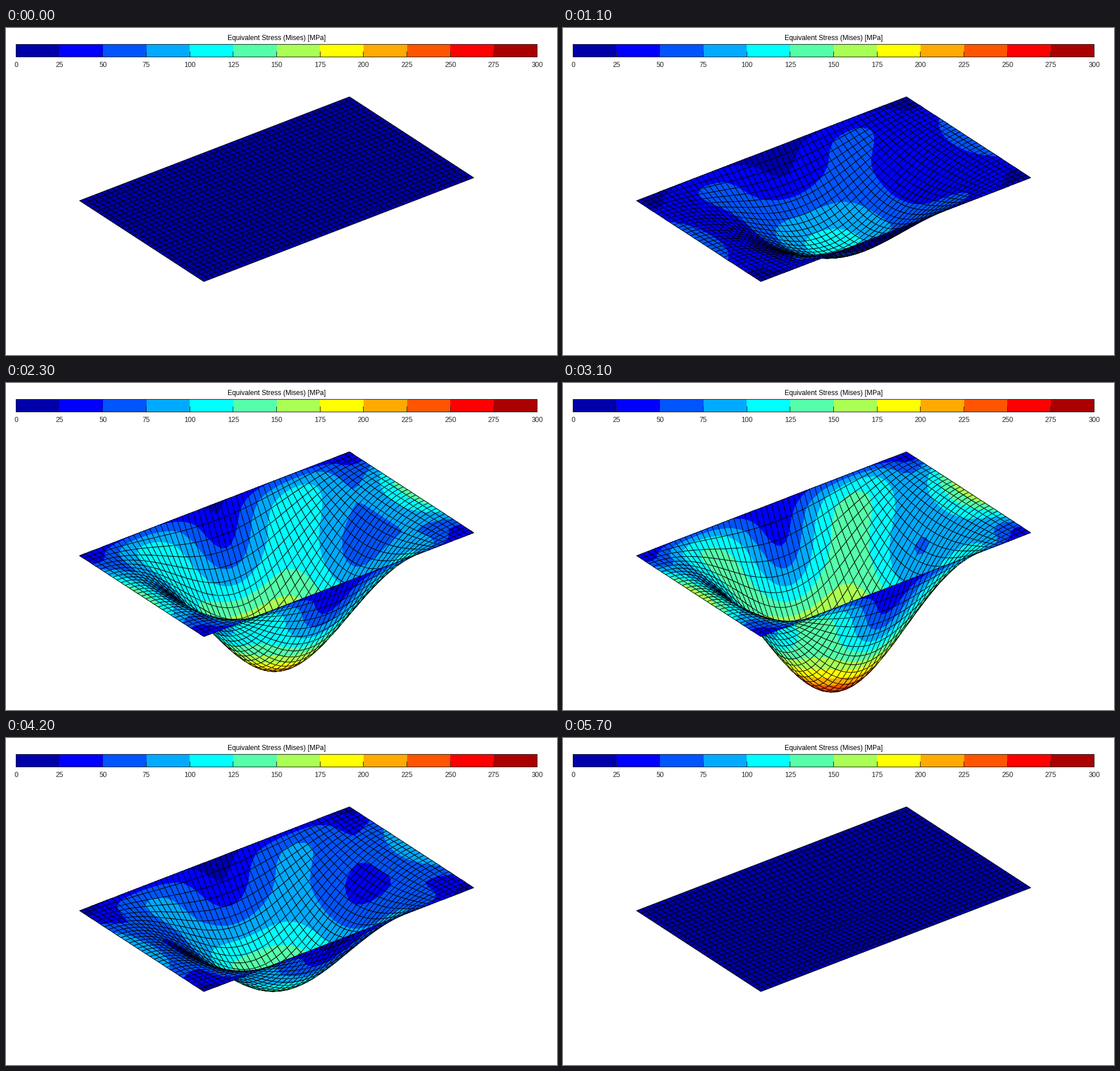
These frames come from a looping animation (960 by 570 pixels, 5800 ms). A matplotlib script:

```python
import numpy as np
import matplotlib.pyplot as plt
from matplotlib.animation import FuncAnimation
from matplotlib.collections import PolyCollection
from matplotlib.patches import Rectangle

W, H, DPI = 960, 570, 100
PT = 72 / DPI                      # points per pixel
FRAMES, STEP_MS = 58, 100
NP, NQ = 50, 30                    # elements along the long and short sides
RISE = 9.3                         # centre deflection in pixels per load step
BAND = 25                          # MPa per colour
COLORS = ["#0000aa", "#0000ff", "#0055ff", "#00aaff", "#00ffff", "#55ffaa",
          "#aaff55", "#ffff00", "#ffaa00", "#ff5500", "#ff0000", "#aa0000"]
PI = np.pi

p, q = np.meshgrid(np.linspace(-.5, .5, NP + 1),
                   np.linspace(-.5, .5, NQ + 1), indexing="ij")
ground = -181 * p + 141 * q
screen_x = 471.6 + 470.3 * p + 216.5 * q


def deflection():
    """Unit shape: short edges clamped, long edges hinged."""
    c = np.cos(PI * p) ** 2
    return c * (1 - .12 * np.sin(PI * p) ** 2) * np.cos(PI * q)


def unit_stress(nu=.3, aspect=5 / 3):
    """Equivalent bending stress per load step."""
    cq = np.cos(PI * q)
    wxx = -2 * PI**2 / aspect**2 * np.cos(2 * PI * p) * cq
    wyy = -PI**2 * np.cos(PI * p) ** 2 * cq
    wxy = PI**2 / aspect * np.sin(2 * PI * p) * np.sin(PI * q)
    mx, my = wxx + nu * wyy, wyy + nu * wxx
    bend = np.sqrt(mx**2 - mx * my + my**2)
    bend *= 1 - .40 * np.sin(PI * q) ** 4 * np.cos(PI * p) ** 2
    bend *= 1 - .27 * np.exp(-((np.abs(p) - .39) / .09) ** 2)
    bend *= 1 + .15 * np.abs(2 * p) ** 12
    gap = .5 - np.abs(q)
    twist = np.sqrt(3) * (1 - nu) * wxy * (.83 - .53 * np.exp(-gap / .04))
    rim = .97 * np.sin(PI * q) ** 4
    return np.sqrt((.896 * bend) ** 2 + (.896 * twist) ** 2 + rim**2)


def corners(a):
    """Four node values of every element."""
    return np.stack([a[:-1, :-1], a[1:, :-1], a[1:, 1:], a[:-1, 1:]],
                    axis=-1).reshape(-1, 4)


QX, QG = corners(screen_x), corners(ground)
QW, QS = corners(deflection()), corners(unit_stress())


def clip_above(pts, vals, level):
    """Part of a polygon where the interpolated value exceeds the level."""
    out = []
    for i in range(len(pts)):
        a, b = vals[i - 1], vals[i]
        if (a >= level) != (b >= level):
            t = (level - a) / (b - a)
            out.append(pts[i - 1] + t * (pts[i] - pts[i - 1]))
        if b >= level:
            out.append(pts[i])
    return out


fig = plt.figure(figsize=(W / DPI, H / DPI), dpi=DPI, facecolor="white")
ax = fig.add_axes([0, 0, 1, 1])
ax.set_xlim(0, W)
ax.set_ylim(H, 0)
ax.axis("off")


def label(x, y, text, color):
    ax.text(x, y, text, color=color, fontsize=12 * PT, ha="center",
            va="center_baseline", family="Liberation Sans")


def draw_scale():
    x0, x1, y0, y1 = 17.5, 925.5, 28.5, 50.5
    cell = (x1 - x0) / len(COLORS)
    for i, color in enumerate(COLORS):
        ax.add_patch(Rectangle((x0 + i * cell, y0), cell, y1 - y0,
                               fc=color, lw=0, aa=False))
    for i in range(len(COLORS) + 1):
        x = x0 + i * cell
        if 0 < i < len(COLORS):
            mid = np.floor(x) + .5
            ax.plot([mid, mid], [y1 - 9, y1], color="#262626", lw=PT,
                    snap=False)
        label(x, 64, str(BAND * i), "#262626")
    ax.add_patch(Rectangle((x0, y0), x1 - x0, y1 - y0, fill=False,
                           ec="#262626", lw=PT, snap=False))
    label(471.5, 17, "Equivalent Stress (Mises) [MPa]", "black")


draw_scale()
mesh = PolyCollection([], closed=True, joinstyle="round")
ax.add_collection(mesh, autolim=False)
LINE = .7


def update(frame):
    load = min(frame, FRAMES - frame)
    drop = RISE * load * QW
    pts = np.stack([QX, 281 + QG + drop], axis=-1)
    stress = load * QS
    low = (stress.min(axis=1) // BAND).astype(int)
    high = (stress.max(axis=1) // BAND).astype(int)
    depth = (1.732 * QG - .577 * drop).mean(axis=1)

    polys, faces, widths = [], [], []

    def put(poly, face, width):
        polys.append(poly)
        faces.append(face)
        widths.append(width)

    for k in np.argsort(depth, kind="stable"):
        if low[k] == high[k]:
            put(pts[k], COLORS[low[k]], LINE)
            continue
        put(pts[k], COLORS[low[k]], 0)
        for band in range(low[k] + 1, high[k] + 1):
            part = clip_above(pts[k], stress[k], band * BAND)
            if len(part) > 2:
                put(part, COLORS[band], 0)
        put(pts[k], "none", LINE)

    mesh.set_verts(polys)
    mesh.set_facecolor(faces)
    mesh.set_edgecolor(["black" if w else "none" for w in widths])
    mesh.set_linewidth(widths)
    mesh.set_antialiased([w > 0 for w in widths])
    return [mesh]


anim = FuncAnimation(fig, update, frames=FRAMES, interval=STEP_MS,
                     init_func=lambda: update(0), repeat=True,
                     repeat_delay=0, blit=False)
plt.show()
```
